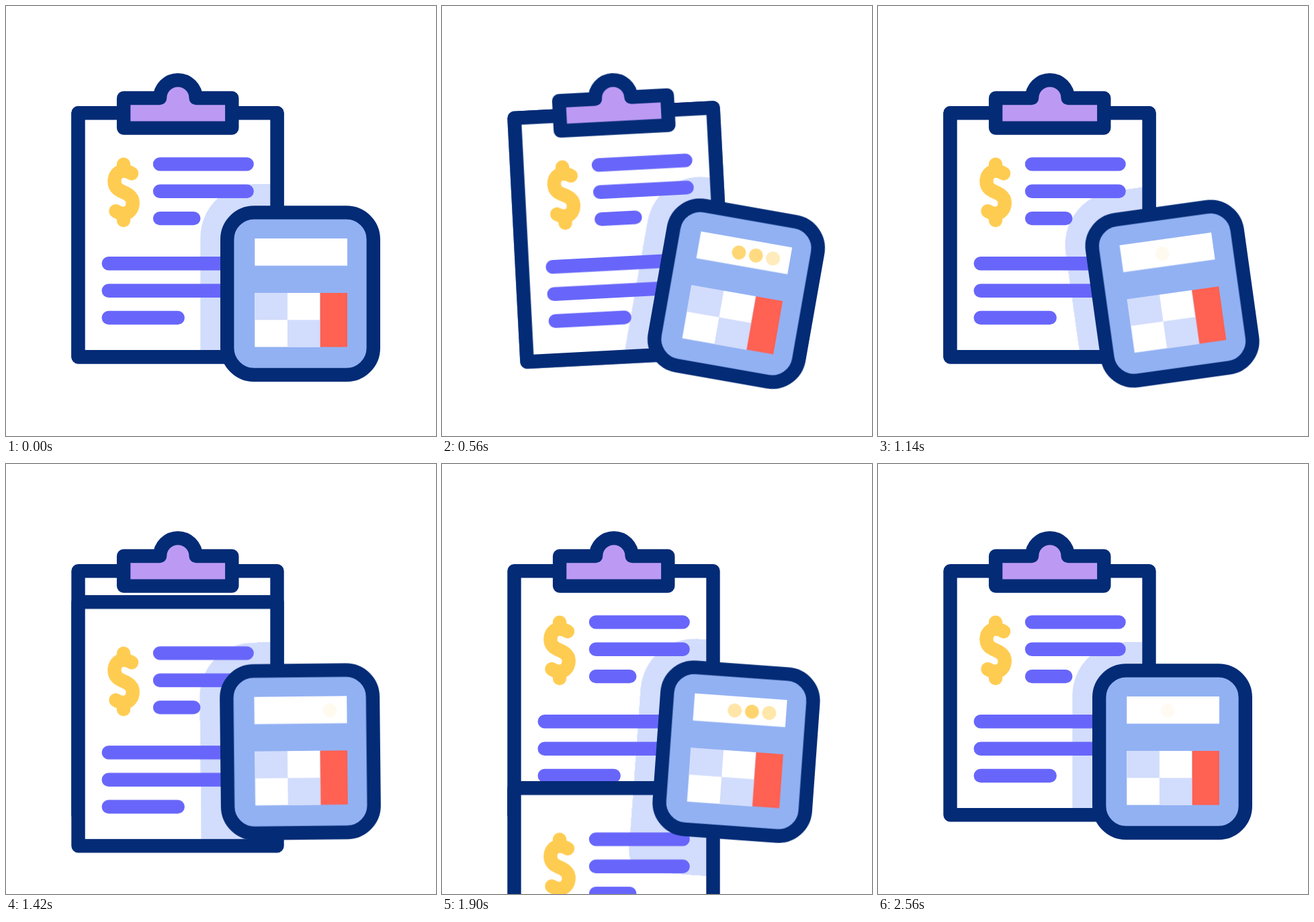
Write an HTML page that moves like this. It is 640 px wide and 640 px high and loops after 2620 ms.

```html
<!DOCTYPE html>
<html lang="en">
<head>
<meta charset="utf-8">
<title>Clipboard and calculator</title>
<style>
  html, body { margin: 0; width: 100%; height: 100%; overflow: hidden; background: #fff; }
  svg { display: block; width: 100%; height: 100%; }

  .tilt, .slide, .turn {
    --dir: 1;
    animation: 2620ms cubic-bezier(.3333, 0, .6667, 1) infinite;
  }
  .tilt { animation-name: tilt; transform-origin: 255px 159px; }
  .slide { animation-name: slide; }
  .turn { animation-name: turn; transform-origin: 438px 428px; }
  /* undoes the motion of the enclosing group */
  .back { --dir: -1; }

  .dot { fill: #ffcc52; opacity: 0; animation: blink 2620ms linear infinite; }
  .dot:nth-of-type(2) { animation-delay: 200ms; }
  .dot:nth-of-type(3) { animation-delay: 400ms; }

  .line { fill: none; stroke-width: 20.4; stroke-linecap: round; stroke-linejoin: round; }
  .navy { stroke: #032b76; }
  .violet { stroke: #6866fa; }
  .gold { stroke: #ffcc52; }
  .pale { fill: #d2dcfc; }
  .white { fill: #fff; }

  @keyframes tilt {
    0%, 42.748%, 100% { transform: rotate(0deg); }
    10.687% { transform: rotate(calc(var(--dir) * 4deg)); }
    21.374% { transform: rotate(calc(var(--dir) * -3deg)); }
    32.061% { transform: rotate(calc(var(--dir) * 2deg)); }
  }
  @keyframes slide {
    0%, 45.802% { transform: translateY(0px); }
    91.603%, 100% { transform: translateY(calc(var(--dir) * 517px)); }
  }
  @keyframes turn {
    0%, 85.496%, 100% { transform: rotate(0deg); }
    21.374% { transform: rotate(10deg); }
    42.748% { transform: rotate(-8deg); }
    64.885% { transform: rotate(6deg); }
  }
  @keyframes blink {
    0%, 30.534%, 53.435%, 83.969%, 100% { opacity: 0; }
    7.634%, 61.069% { opacity: 1; }
  }
</style>
</head>
<body>
<svg viewBox="0 0 640 640">
  <defs>
    <rect id="paper" x="107.5" y="159.3" width="296" height="363"/>
    <clipPath id="inside"><use href="#paper"/></clipPath>
    <path id="shade" class="pale" d="M289.3 345a80 80 0 0 1 80-80H560V616H319.3a30 30 0 0 1-30-30Z"/>
    <g id="ink" class="line">
      <use href="#paper" class="navy"/>
      <path class="violet" d="M229 235.4H358.6M229 275.7H358.6M229 316.1H279.3M152.7 383.3H324.7M152.7 423.7H324.7M152.7 464H255.7"/>
      <path class="gold" d="M175 235.7V245.5M175 309V319M187 249.2C183 246.6 179 245.6 175 245.6C167 245.6 161.4 252 161.4 261C161.4 271 168 274.2 175 277.2C182 280.2 188.7 284 188.7 293C188.7 302 183 308.8 175 308.8C171 308.8 167 307.6 163.4 305.2"/>
    </g>
  </defs>

  <g class="tilt">
    <g>
      <use href="#paper" class="white"/>
      <g clip-path="url(#inside)">
        <g class="tilt back"><g class="turn"><use href="#shade"/></g></g>
      </g>
      <use href="#ink"/>
    </g>
    <g class="slide">
      <use href="#paper" class="white"/>
      <g clip-path="url(#inside)">
        <g class="slide back"><g class="tilt back"><g class="turn"><use href="#shade"/></g></g></g>
      </g>
      <use href="#ink"/>
    </g>
    <path class="line navy" style="fill:#bc9af3" d="M175.1 137H229.1a26.75 26.75 0 0 1 53.5 0H336.3V181.6H175.1Z"/>
  </g>

  <g class="turn">
    <rect class="line navy" style="fill:#92b1f3" x="329.2" y="307.4" width="217.6" height="241.6" rx="40"/>
    <path class="white" d="M370.3 346H508V386.4H370.3ZM370.3 426.9H467.6V507.4H370.3Z"/>
    <path class="pale" d="M370.3 426.9H418.9V467.2H467.6V507.4H418.9V467.2H370.3Z"/>
    <path fill="#ff6152" d="M467.6 426.9H508V507.4H467.6Z"/>
    <circle class="dot" cx="482.7" cy="367.2" r="10.5"/>
    <circle class="dot" cx="457" cy="367.2" r="10.5"/>
    <circle class="dot" cx="431.3" cy="367.2" r="10.5"/>
  </g>
</svg>
</body>
</html>
```
